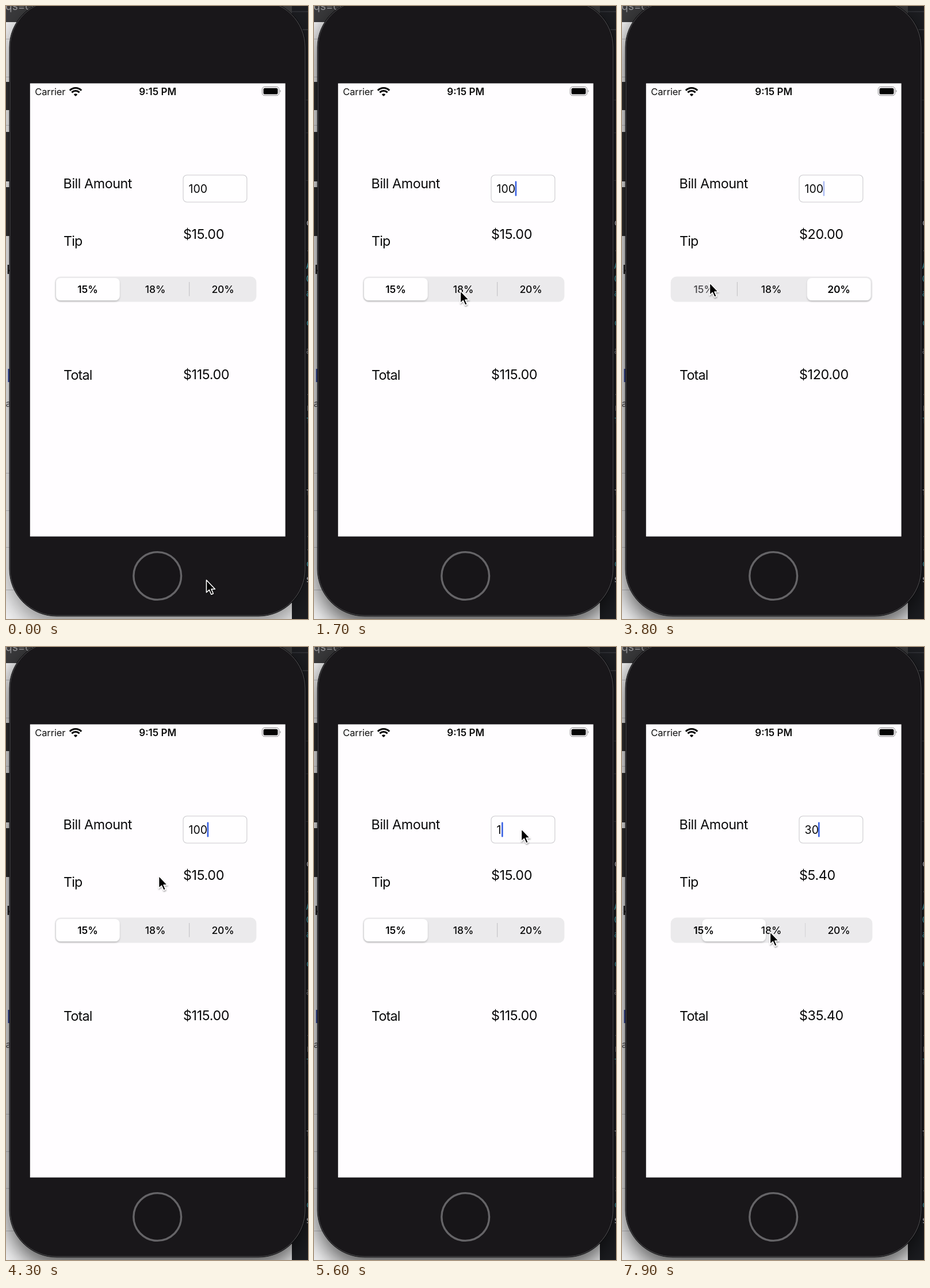
Recreate the animation shown at these times as an HTML page. Size 525 px wide and 1066 px high, loop 8000 ms.

```html
<!DOCTYPE html>
<html lang="en">
<head>
<meta charset="utf-8">
<title>Tip calculator</title>
<style>
  html, body { margin: 0; width: 100%; height: 100%; overflow: hidden; background: #1c1d21; }
  svg { display: block; width: 525px; height: 1066px; font-family: Inter, Roboto, "Liberation Sans", sans-serif; }
  text { white-space: pre; }
  .label { font-size: 23.3px; letter-spacing: -.45px; fill: #09090a; }
  .short { letter-spacing: -.8px; }
  .money { letter-spacing: -.35px; }
  .seg { font-size: 17.5px; font-weight: 500; letter-spacing: -.1px; text-anchor: middle; }
  .menu { font-size: 16.6px; fill: #fff; text-anchor: middle; }
  .code { font-family: "DejaVu Sans Mono", monospace; font-size: 15px; }
</style>
</head>
<body>
<svg viewBox="0 0 525 1066">
  <defs>
    <filter id="soft" x="-20%" y="-20%" width="140%" height="140%"><feGaussianBlur stdDeviation="20"/></filter>
    <filter id="lift" x="-10%" y="-20%" width="120%" height="150%">
      <feDropShadow dx="0" dy="2" stdDeviation="1.8" flood-opacity=".2"/>
    </filter>
    <filter id="drop" x="-40%" y="-30%" width="190%" height="170%">
      <feDropShadow dx="0.5" dy="2" stdDeviation="1.3" flood-opacity=".35"/>
    </filter>
    <clipPath id="fan"><path d="M121 157 L107 143 V134 H135 V143 Z"/></clipPath>
  </defs>

  <g id="desk">
    <rect width="497" height="1066" fill="#f3f3f4"/>
    <rect width="497" height="28" fill="#3b3b3d"/>
    <text x="-1" y="7" font-size="19" fill="#97979a">qs=ch</text>
    <rect x="497" width="28" height="1066" fill="#1d1e22"/>
    <rect x="497" y="9" width="28" height="1.5" fill="#34353a"/>
    <rect x="497" y="40.5" width="28" height="1.2" fill="#45464b"/>
    <text x="-11" y="466" font-size="21" font-weight="600" fill="#202022">ck</text>
    <rect x="3.5" y="631" width="4" height="23" fill="#3148a8"/>
    <text x="-10" y="697" font-size="16" fill="#505054">ea</text>
  </g>
  <rect id="shade" x="6" y="2" width="515" height="1077" rx="85" filter="url(#soft)"/>

  <rect x="6" y="-10" width="515" height="1071" rx="82" fill="#19171a" stroke="#08080a" stroke-width="1"/>
  <rect x="7" y="-9" width="513" height="1069" rx="81" fill="none" stroke="#505052" stroke-width="1"/>
  <circle cx="263.2" cy="991" r="41.4" fill="#171518" stroke="#656467" stroke-width="3.4"/>
  <rect x="41.8" y="134.5" width="443.8" height="788" fill="#fffdff"/>

  <text x="50.2" y="154.7" font-size="16.5" letter-spacing="-.1" fill="#111">Carrier</text>
  <g clip-path="url(#fan)" fill="none" stroke="#080808" stroke-width="3.1">
    <circle cx="121" cy="156.5" r="14"/>
    <circle cx="121" cy="156.5" r="9"/>
    <circle cx="121" cy="156.5" r="2.4" fill="#080808"/>
  </g>
  <text x="263.7" y="154.7" font-size="17" font-weight="600" text-anchor="middle" fill="#0b0b0b">9:15 PM</text>
  <rect x="445.3" y="140.5" width="29.4" height="15.2" rx="4.3" fill="none" stroke="#8a898c" stroke-width="1"/>
  <rect x="447.5" y="142.7" width="25" height="10.8" rx="2.6" fill="#050505"/>
  <path d="M476.3 145.6 q2.6 2.5 0 5 z" fill="#8a898c"/>

  <text class="label" x="99.6" y="317.2">Bill Amount</text>
  <text class="label short" x="100" y="417.2">Tip</text>
  <text class="label short" x="100" y="650">Total</text>
  <text class="label money" id="tip" x="308" y="404.6"></text>
  <text class="label money" id="total" x="308" y="649"></text>

  <rect x="308" y="294" width="110.8" height="47" rx="6.5" fill="#fffeff" stroke="#cbcace" stroke-width="1.1"/>
  <text id="bill" x="317.6" y="325" font-size="19.5" fill="#09090a"></text>
  <rect id="caret" y="304.6" width="2.6" height="25.8" rx="1.2" fill="#3860e2"/>

  <rect x="84.7" y="470.5" width="350.6" height="44" rx="10" fill="#ebeaec"/>
  <rect class="bar" x="199.8" y="480" width="1.2" height="24.5" fill="#c6c5c9"/>
  <rect class="bar" x="318" y="480" width="1.2" height="24.5" fill="#c6c5c9"/>
  <rect id="thumb" y="473" width="110.6" height="39" rx="8" fill="#fffeff" filter="url(#lift)"/>
  <text class="seg" x="142" y="499">15%</text>
  <text class="seg" x="259.5" y="499">18%</text>
  <text class="seg" x="377" y="499">20%</text>

  <g id="popup">
    <path d="M148 229 H462 a9 9 0 0 1 9 9 V264 a9 9 0 0 1 -9 9 H362 L350.5 285 L339 273 H148 a9 9 0 0 1 -9 -9 V238 a9 9 0 0 1 9 -9 Z" fill="#1d1d1f"/>
    <path d="M241 229 V273 M372 229 V273" stroke="#4c4c4f"/>
    <text class="menu" x="190" y="257">Select</text>
    <text class="menu" x="306.5" y="257">Select All</text>
    <text class="menu" x="421.5" y="257">Paste</text>
  </g>

  <path id="pointer" d="M.4 1.2 V22.7 L5.3 18.2 L8.8 26.2 L12.3 24.7 L8.9 16.9 H15.4 Z" fill="#050505"
    stroke="#fff" stroke-width="1.5" stroke-linejoin="round" filter="url(#drop)"/>
</svg>

<script>
const LOOP = 8000, SLIDE = 300;
const $ = id => document.getElementById(id);
const all = sel => [...document.querySelectorAll(sel)];
const [bars, segs] = [all('.bar'), all('.seg')];

// Page rules, dark blocks and the sliver of code behind the phone
const desk = $('desk');
function add(tag, attrs, text = '') {
  const el = document.createElementNS('http://www.w3.org/2000/svg', tag);
  for (const k in attrs) el.setAttribute(k, attrs[k]);
  el.textContent = text;
  desk.append(el);
}
for (const y of [57, 123, 207, 812, 877, 941, 1015])
  add('rect', { y, width: 90, height: 1, fill: '#c3c3c6' });
for (const [y, height] of [[132, 49], [219, 86], [315, 85]])
  add('rect', { y, width: 20, height, fill: '#303032' });
for (const y of [163, 220, 303])
  add('rect', { x: 515, y, width: 10, height: 1, fill: '#3b3c42' });
const inks = ['#d5d5dc', '#45a9b5', '#85868c'];
for (const [y, ch, ink] of [
  [382, 'c', 0], [430, '-', 2], [457, 'A', 1], [480, 'C', 1], [505, 'a', 1], [556, 'c', 1],
  [605, 'a', 2], [680, '-', 2], [704, 'r', 2], [728, 'l', 1], [853, 'l', 0],
  [927, '-', 2], [950, '-', 2], [975, 'c', 1], [1002, 's', 0]
]) add('text', { class: 'code', x: 521.5, y, fill: inks[ink] }, ch);

// Pointer stops: time, x, y
const path = [
  [0, 348, 997], [150, 348, 997], [950, 254, 494], [2000, 254, 494], [2600, 380, 497],
  [3150, 380, 497], [3720, 152, 480], [4050, 152, 480], [4500, 345, 338], [4850, 360, 315],
  [7050, 360, 315], [7500, 190, 470], [7740, 257, 494], [LOOP, 257, 494]
];
// Segment taps: time, segment, tip, total
const taps = [
  [-1000, 0, '$15.00', '$115.00'], [1705, 1, '$18.00', '$118.00'], [2920, 2, '$20.00', '$120.00'],
  [3870, 0, '$15.00', '$115.00'], [7762, 1, '$5.40', '$35.40']
];
// Field content: time, text, caret position
const typed = [
  [0, '100', 349.6], [5480, '10', 338], [5580, '1', 326], [5680, '', 318],
  [6700, '3', 330], [6900, '30', 341]
];
const caretStarts = [-750, 4950, 5480, 5780, 6900];
const thumbX = [87, 204.5, 321.9];

const clamp = v => Math.max(0, Math.min(1, v));
const ramp = (t, a, b) => clamp((t - a) / (b - a));
const ease = p => p * p * (3 - 2 * p);
const mix = (a, b, p) => a + (b - a) * p;
const lastAt = (list, t) => list.findLastIndex(row => row[0] <= t);

function blink(t) {
  const p = (t - caretStarts.findLast(s => s <= t)) % 1000;
  return p < 700 ? 1 - ramp(p, 480, 600) : ramp(p, 850, 1000);
}

function draw(t) {
  const i = Math.min(lastAt(path, t), path.length - 2);
  const [a, b] = [path[i], path[i + 1]];
  const p = ease(ramp(t, a[0], b[0]));
  $('pointer').setAttribute('transform', `translate(${mix(a[1], b[1], p)} ${mix(a[2], b[2], p)})`);

  const k = lastAt(taps, t);
  const [start, now, tip, total] = taps[k];
  const before = k ? taps[k - 1][1] : now;
  const q = ease(ramp(t, start, start + SLIDE));
  $('tip').textContent = tip;
  $('total').textContent = total;
  $('thumb').setAttribute('x', mix(thumbX[before], thumbX[now], q));

  const shown = (bar, seg) => +(seg !== bar && seg !== bar + 1);
  bars.forEach((el, n) => el.setAttribute('opacity', mix(shown(n, before), shown(n, now), q)));
  const pressed = (t > 2780 && t < 3080) ? 2 : (t > 3740 && t < 3950) ? 0 : -1;
  segs.forEach((el, n) => {
    el.style.fontWeight = n === (q < .5 ? before : now) ? 600 : 500;
    el.setAttribute('fill', n === pressed ? '#4a494c' : '#0b0b0c');
  });

  const [, text, x] = typed[lastAt(typed, t)];
  $('bill').textContent = text;
  $('caret').setAttribute('x', x);
  $('caret').setAttribute('opacity', blink(t));
  $('popup').setAttribute('opacity', ramp(t, 5140, 5240) * (1 - ramp(t, 5470, 5560)));
  $('shade').setAttribute('opacity', mix(.42, .66, ramp(t, 930, 1080)));
}

const origin = performance.now();
function tick() {
  draw((performance.now() - origin) % LOOP);
  requestAnimationFrame(tick);
}
draw(0);
requestAnimationFrame(tick);
</script>
</body>
</html>
```
